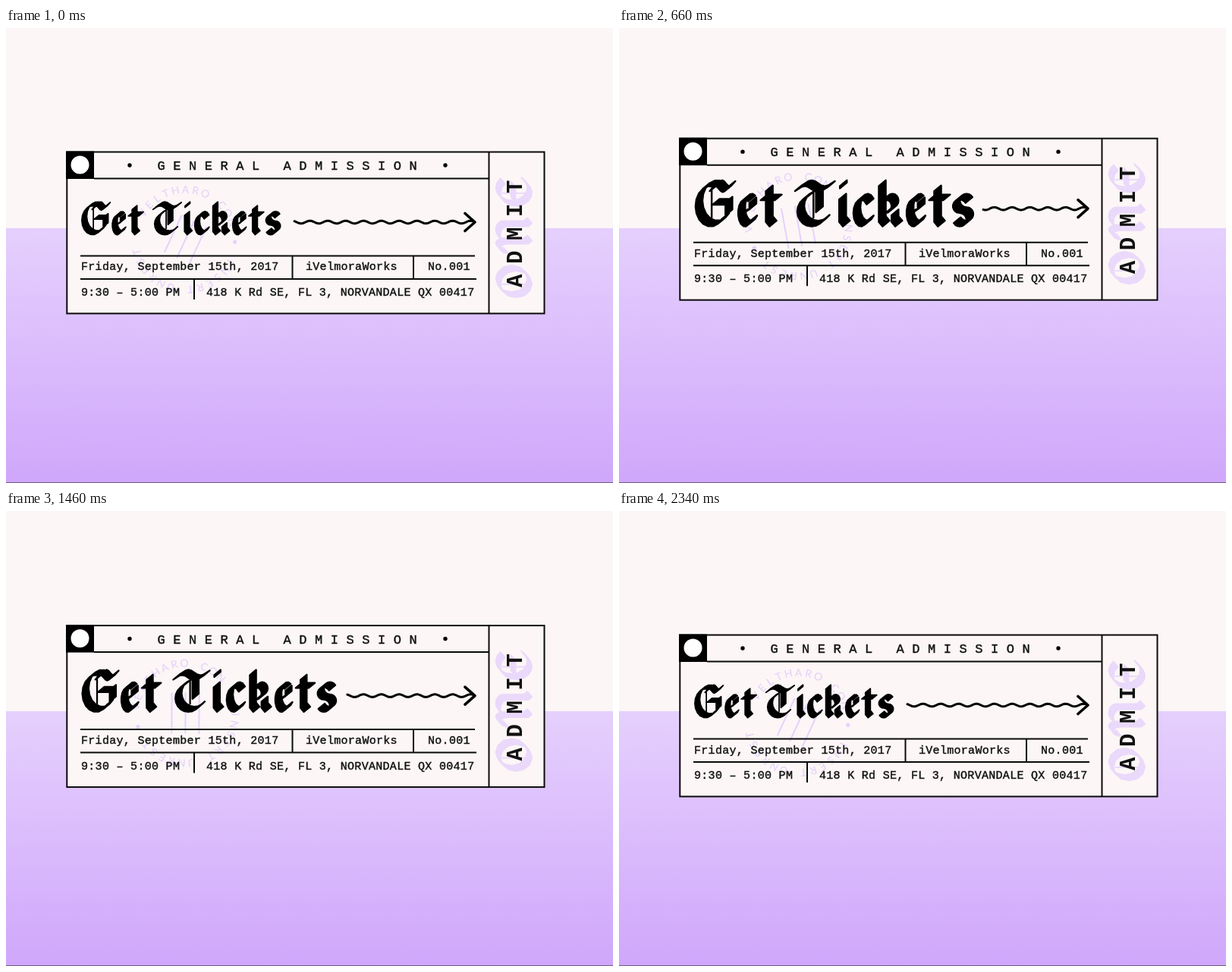
An HTML page for the animation above (2360 ms loop, 800 px wide and 600 px high).

```html
<!DOCTYPE html>
<html lang="en">
<head>
<meta charset="utf-8">
<title>Get Tickets</title>
<style>
  html, body { margin: 0; width: 100%; height: 100%; overflow: hidden; background: #fcf6f6; }
  svg { display: block; width: 800px; height: 600px; }
  text { font: 15px "Liberation Mono", "Courier New", monospace; letter-spacing: .3px; fill: #111; stroke: #111; stroke-width: .4px; }
  .rule { fill: none; stroke: #0a0a0a; stroke-width: 2; }
  .letters { stroke-width: 2.5; stroke-linejoin: round; stroke-linecap: round; }
  .arrow { fill: none; stroke: #000; stroke-linecap: round; stroke-linejoin: round; }
  .header { font-size: 17px; letter-spacing: 10.55px; }
  .admit { font-size: 29px; font-weight: bold; letter-spacing: 13.6px; stroke: none; }
  #ring text { font: 500 14px Lato, sans-serif; letter-spacing: 0; text-anchor: middle; fill: #e4d3fb; stroke: none; }
</style>
</head>
<body>
<svg viewBox="0 0 800 600">
  <defs>
    <linearGradient id="sea" x2="0" y2="1">
      <stop stop-color="#e5d0fd"/>
      <stop offset="1" stop-color="#d0a7fb"/>
    </linearGradient>
  </defs>
  <rect width="800" height="600" fill="#fcf6f6"/>
  <rect y="264" width="800" height="336" fill="url(#sea)"/>
  <rect y="599" width="800" height="1" fill="#6f5f85"/>

  <g id="ticket">
    <rect class="rule" x="80.3" y=".5" width="629.2" height="213" style="fill:#fcf6f6"/>
    <g id="ring">
      <path d="M-18-27v54M0-27v54M18-27v54" fill="none" stroke="#e4d3fb" stroke-width="2"/>
    </g>
    <path class="rule" d="M116 35.5H636.5M636.5 0V214M98 137.5H618M98 168H620M377.5 137.5V168M537 137.5V168M248 168V195"/>
    <rect x="79" y="-.5" width="37" height="36.5"/>
    <circle cx="97.5" cy="17.5" r="12" fill="#fff"/>

    <circle cx="163" cy="18" r="2.7"/>
    <text class="header" x="199.5" y="24">GENERAL ADMISSION</text>
    <circle cx="579" cy="18" r="2.7"/>

    <g id="title" class="letters" stroke="#000" role="img" aria-label="Get Tickets"/>
    <path id="wave" class="arrow" stroke-width="3"/>
    <path class="arrow" d="M605 81.5L618 93L605 104.5" stroke-width="3.6"/>

    <text x="99" y="156.5">Friday, September 15th, 2017</text>
    <text x="395" y="156.5">iVelmoraWorks</text>
    <text x="556" y="156.5">No.001</text>
    <text x="99" y="190">9:30 – 5:00 PM</text>
    <text x="264" y="190">418 K Rd SE, FL 3, NORVANDALE QX 00417</text>

    <g id="one" class="letters" fill="#ead9fb" stroke="#ead9fb" transform="translate(694 195) rotate(-90) scale(.77)"/>
    <text class="admit" transform="translate(680 179) rotate(-90)">ADMIT</text>
  </g>
</svg>
<script>
const $ = id => document.getElementById(id);
const LOOP = 2360, HALF = 1000, LEAD = 10;
const XHEIGHT = 41, CAP = 59, FOOT = 5;

function add(parent, tag, attributes) {
  const node = document.createElementNS('http://www.w3.org/2000/svg', tag);
  for (const name in attributes) node.setAttribute(name, attributes[name]);
  parent.append(node);
  return node;
}

const sample = (steps, point) => Array.from({length: steps + 1}, (_, i) => point(i / steps));

// Sweep a slanted broad nib along a line of [x, height] points.
function pen(points, nx = 4.6, ny = 3.8) {
  return points.slice(1).map(([bx, by], i) => {
    const [ax, ay] = points[i];
    const quad = [[ax - nx, ny - ay], [ax + nx, -ny - ay], [bx + nx, -ny - by], [bx - nx, ny - by]];
    if (nx * (ay - by) + ny * (bx - ax) < 0) quad.reverse();
    return 'M' + quad.join('L') + 'Z';
  }).join('');
}

const stem = (x, top) => pen([[x, top], [x, FOOT + 6], [x + 5, FOOT]]);
const bar = (x, width, height) => pen([[x, height], [x + width, height]]);
const hair = (x, top) => pen([[x, top], [x, 13]], 0, 0);
const tick = (x, top, length) => pen([[x, top], [x, top - length]]);
const arc = (cx, cy, rx, ry, from, to) => pen(sample(12, u => {
  const angle = (from + (to - from) * u) * Math.PI / 180;
  return [cx + rx * Math.cos(angle), cy + ry * Math.sin(angle)];
}));
const cup = (cx, rx, top, open) => arc(cx, (top + FOOT) / 2, rx, (top - FOOT) / 2, open, 322);
const flag = (x, width) => pen(sample(10, u =>
  [x + width * u, 55 + 4 * Math.sin((u * 1.25 - .12) * 2 * Math.PI)]));

// Each blackletter glyph: advance width, then its pen strokes.
const GLYPHS = {
  G: [57, cup(28, 20, CAP, 80), flag(27, 25), tick(48, 37, 17), bar(31, 15, 34), hair(25, 52)],
  T: [54, cup(27, 19, 45, 110), flag(5, 44), tick(33, 50, 26), hair(25, 52)],
  O: [79, arc(31, 32, 23, 27, 0, 360), hair(26, 52)],
  N: [78, arc(13, 46, 8, 13, 180, 0), stem(21, 46), arc(36, 46, 15, 13, 180, 0), stem(51, 46)],
  E: [55, cup(30, 22, CAP, 45), bar(14, 26, 33), hair(25, 52)],
  e: [33, cup(17, 9, XHEIGHT, 60), tick(23, 36, 8), pen([[23, 28], [10, 19]])],
  t: [29, stem(12, 52), bar(5, 19, 40)],
  i: [21, stem(10, XHEIGHT), tick(11, CAP, 3)],
  c: [33, cup(18, 10, XHEIGHT, 40)],
  k: [38, stem(9, CAP), arc(18, 32, 8, 9, 180, -90), stem(26, 20)],
  s: [33, arc(17, 32, 9, 9, 30, 270), arc(17, 14, 9, 9, 90, -150)],
  ' ': [17]
};

function blackletter(group, word) {
  let left = 0;
  for (const letter of word) {
    const [advance, ...strokes] = GLYPHS[letter];
    add(group, 'path', {d: strokes.join(''), transform: `translate(${left})`});
    left += advance;
  }
}

function buildRing() {
  const motto = 'VELTHARO CON • INSERT UNREST • ';
  [...motto].forEach((letter, i) => {
    const angle = (i - 7.15) * 360 / motto.length;
    add($('ring'), 'text', {transform: `rotate(${angle}) translate(0 -61)`}).textContent = letter;
  });
}

const wavePath = start => 'M' + sample(120, u => {
  const x = 616 + (start - 616) * u;
  return [x, 93 - 1.8 * Math.sin((618 - x) / 23.5 * 2 * Math.PI)];
}).join('L');

function expoInOut(x) {
  if (x <= 0) return 0;
  if (x >= 1) return 1;
  return x < .5 ? 2 ** (20 * x - 11) : 1 - 2 ** (9 - 20 * x);
}

function draw(now) {
  const t = now % LOOP + LEAD;
  const p = expoInOut(t / HALF) - expoInOut((t - HALF) / HALF);
  $('ticket').setAttribute('transform', `translate(0 ${163 - 18.7 * p})`);
  $('title').setAttribute('transform', `translate(97.5 ${110.5 + 7.5 * p}) scale(${.705 + .295 * p})`);
  $('ring').setAttribute('transform', `translate(236.5 116) rotate(${25 - 37 * p})`);
  $('wave').setAttribute('d', wavePath(380 + 105 * p));
  requestAnimationFrame(draw);
}

blackletter($('title'), 'Get Tickets');
blackletter($('one'), 'ONE');
buildRing();
draw(performance.now());
</script>
</body>
</html>
```
